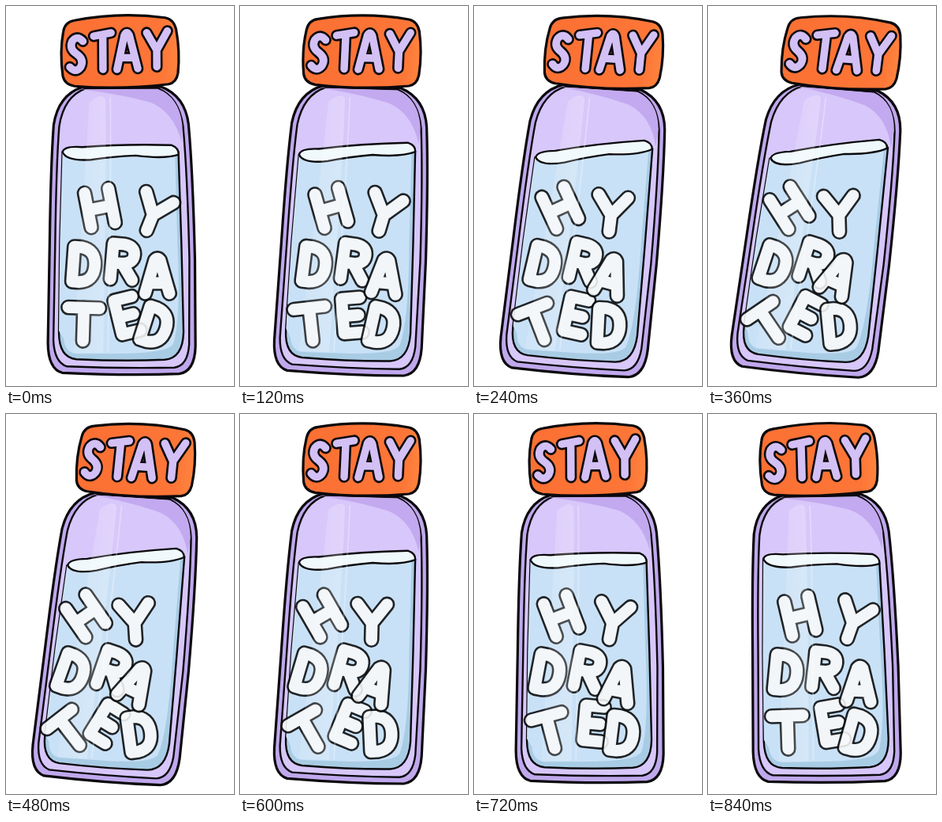
An HTML page that plays this animation: 289 by 480 pixels, repeating every 0.96 s.

```html
<!DOCTYPE html>
<html lang="en">
<head>
<meta charset="utf-8">
<title>Stay hydrated</title>
<style>
  html, body { margin: 0; width: 100%; height: 100%; overflow: hidden; background: #fff; }
  svg { display: block; width: 100%; height: 100%; }
  path { stroke-linecap: round; stroke-linejoin: round; fill: none; }
  .line { stroke: #0b090c; stroke-width: 2.4; }
  .outer { stroke-width: 3.2; }
  .letter { opacity: .88; }
  .letter .edge { stroke: #08090a; stroke-width: 18; }
  .letter .face { stroke: #f8f9fa; stroke-width: 13.3; }
  .title .edge { stroke: #0b090c; stroke-width: 14; }
  .title .face { stroke: #d3c0f5; stroke-width: 9; }
</style>
</head>
<body>
<svg viewBox="0 0 289 480" role="img" aria-label="Stay hydrated">
  <defs>
    <linearGradient id="orange" x2="1">
      <stop stop-color="#fb7033"/><stop offset=".85" stop-color="#fd7637"/><stop offset="1" stop-color="#ff843f"/>
    </linearGradient>
    <linearGradient id="shine" x2="1">
      <stop stop-color="#fff" stop-opacity=".1"/><stop offset="1" stop-color="#fff" stop-opacity=".24"/>
    </linearGradient>
    <clipPath id="waterClip"><path id="waterMask"/></clipPath>
  </defs>

  <g class="bottle">
    <path class="line outer" style="fill:#bfa8ec" d="M98 102Q67 112 61 150Q57 200 55 300L52 425Q52 458 70 463Q148 467 218 465Q238 462 239 430V320Q237 210 232 150Q228 114 197 102Z"/>
    <path class="line" style="fill:#d7c7fa" d="M102 104Q74 114 68 152Q64 200 62 300L59 422Q60 450 76 455Q148 458 212 457Q229 455 231 428L232 320Q230 210 225 152Q220 115 193 104Z"/>
    <path style="fill:#c3a9ef" d="M96 105Q150 112 184 122Q213 134 223 172L224 150Q220 115 193 105Z"/>
    <path id="water" class="line" style="fill:#a9cce5"/>
    <path clip-path="url(#waterClip)" style="fill:#c9e1f6" d="M60 160H214L217 300Q221 395 211 427Q205 438 150 439H90Q74 439 72 420L60 400Z"/>
    <path id="surface" class="line" style="fill:#eff9fc" d="M72 184Q74 176 97 178Q150 174 210 176Q220 180 219 188Q202 194 165 189Q135 190 108 194Q77 196 72 184Z"/>
  </g>

  <g id="letters"></g>

  <g class="bottle">
    <path style="fill:url(#shine)" d="M106 122Q122 108 127 118Q128 200 122 438H84Q98 250 106 122Z"/>
    <path style="stroke:#fff;stroke-opacity:.28;stroke-width:2" d="M133 116Q134 200 128 436"/>
    <path class="line outer" style="fill:url(#orange)" d="M88 18Q146 7 203 15Q214 17 217 30Q222 58 219 85Q217 97 207 99Q146 106 88 101Q75 99 73 88Q69 58 74 32Q76 20 88 18Z"/>
    <g id="title" class="title" transform="translate(145 58) scale(1.05) translate(-145 -59)"></g>
  </g>
</svg>
<script>
const STEP = 120, STEPS = 8;
const byId = id => document.getElementById(id);
const bubble = d => `<path class="edge" d="${d}"/><path class="face" d="${d}"/>`;

byId('title').innerHTML = [
  'M101 46Q94 38 88 46Q84 55 93 61Q103 68 98 77Q92 85 85 77',
  'M114 40L135 36M125 38V80',
  'M142 80L151 39Q154 33 157 39L167 79M146 66H162',
  'M178 36L190 57L203 34M190 57V77'
].map(bubble).join('');

const shapes = {
  H: 'M-14 -20V20M14 -20V20M-14 0H14',
  Y: 'M-17 -20L0 2L17 -20M0 2V21',
  D: 'M-12 -20V20H-4Q13 18 13 0T-4 -20Z',
  R: 'M-12 21V-20H0Q13 -19 13 -9T0 2H-12M0 2L13 20',
  A: 'M-14 20L-3 -18Q0 -22 3 -18L14 20M-9 8H9',
  T: 'M-18 -18H18M0 -18V20',
  E: 'M11 -20H-10V20H11M-10 0H8'
};

// Each letter floats around a home place; lower rows follow the bottle sooner
const rows = [
  { lag: 3.1, letters: [
    { name: 'T', x: 89, y: 401, sway: 12, angle: -18, turn: -20 },
    { name: 'E', x: 140, y: 391, sway: 17, angle: 9, turn: 23 },
    { name: 'D', x: 179, y: 404, sway: 13, angle: 5, turn: -13 }] },
  { lag: 3.5, letters: [
    { name: 'D', x: 91, y: 327, sway: 8, angle: 12, turn: 8 },
    { name: 'R', x: 141, y: 323, sway: 7, angle: 12, turn: 7 },
    { name: 'A', x: 178, y: 341, sway: 15, angle: 13, turn: 13 }] },
  { lag: 3.9, letters: [
    { name: 'H', x: 110, y: 255, sway: 9, angle: -23, turn: -12 },
    { name: 'Y', x: 175, y: 262, sway: 12, angle: 9, turn: -13 }] }
];
const TURN_LAG = 3.8;

const letters = rows.flatMap(row => row.letters.map(letter => {
  const node = document.createElementNS('http://www.w3.org/2000/svg', 'g');
  node.setAttribute('class', 'letter');
  node.innerHTML = bubble(shapes[letter.name]);
  byId('letters').append(node);
  return { ...letter, lag: row.lag, node };
}));

// One swing per loop, peaking at the given step
const swing = (step, peak) => Math.cos((step - peak) * 2 * Math.PI / STEPS);

function draw(step) {
  const lean = 2.75 + 4.4 * swing(step, 3);
  const bottleMove = `translate(147 247) rotate(${lean * .65}) skewX(${-lean * .35}) translate(-147 -247)`;
  for (const part of document.querySelectorAll('.bottle')) part.setAttribute('transform', bottleMove);

  // The water surface tips against the bottle
  const tip = -1.5 * lean - .6;
  const rise = 73 * Math.sin(tip * Math.PI / 180);
  byId('surface').setAttribute('transform', `rotate(${tip} 145 185)`);
  const water = `M72 ${184 - rise}L68 300L66 412Q66 444 88 446Q148 449 200 447Q223 445 224 412L222 300L219 ${187 + rise}Z`;
  byId('water').setAttribute('d', water);
  byId('waterMask').setAttribute('d', water);

  for (const { node, x, y, sway, angle, turn, lag } of letters) {
    const left = x - sway * swing(step, lag);
    const tilt = angle + turn * swing(step, TURN_LAG);
    node.setAttribute('transform', `translate(${left} ${y}) rotate(${tilt}) scale(1.1)`);
  }
}

function tick() {
  draw(Math.floor(performance.now() / STEP) % STEPS);
  requestAnimationFrame(tick);
}
tick();
</script>
</body>
</html>
```
